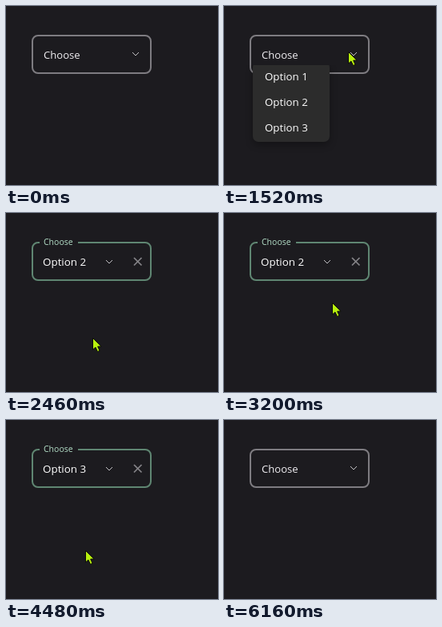
Animation of 265x224 px, one loop 6.9 s. Source, as an HTML page with a canvas:

```html
<!DOCTYPE html>
<html lang="en">
<head>
<meta charset="utf-8">
<title>Dropdown field</title>
<style>
html, body { margin: 0; width: 100%; height: 100%; overflow: hidden; background: #1c1b1f; }
canvas { display: block; }
</style>
</head>
<body>
<canvas id="stage" width="265" height="224"></canvas>
<script>
const ctx = document.getElementById('stage').getContext('2d');
const BG = '#1c1b1f', GREY = '#7e7c81', GREEN = '#5f8672';
const LOOP = 6900, START = 520, LEAD = 12, TICK = 66.8;

const speedUp = f => f * f;
const slowDown = f => 1 - (1 - f) ** 2;
const smooth = f => f * f * (3 - 2 * f);
const clamp = v => Math.max(0, Math.min(1, v));
const mix = (a, b, f) => a + (b - a) * f;
const within = (k, a, b) => k >= a && k < b;

// Stops of the pointer
const edge = [214, 212], arrow = [155, 57], second = [94, 129],
  field = [96, 63], third = [94, 161], cross = [160, 64];

// Pointer moves in ticks; bend is the control point of a curved move
const moves = [
  { start: 0, end: 9, from: [206, 213], to: arrow, ease: slowDown },
  { start: 15, end: 22, from: arrow, to: second, ease: smooth },
  { start: 26, end: 32, from: second, to: edge, ease: speedUp, bend: [111, 186] },
  { start: 37, end: 44, from: edge, to: field, ease: slowDown },
  { start: 47, end: 53, from: field, to: third, ease: smooth },
  { start: 58, end: 69, from: third, to: cross, ease: smooth, bend: [209, 213] },
  { start: 75, end: 83, from: cross, to: [231, 208], ease: speedUp }
];
const presses = [11, 24, 44, 54, 72];

function pointerAt(k) {
  if (!within(k, 0, 33) && !within(k, 37, 84)) return null;
  const { start, end, from, to, ease, bend } = moves.findLast(m => k >= m.start);
  const f = ease(clamp((k - start) / (end - start)));
  return from.map((a, i) => {
    const c = bend ? bend[i] : (a + to[i]) / 2;
    return Math.round(mix(mix(a, c, f), mix(c, to[i], f), f));
  });
}

function text(s, x, y, size, color) {
  ctx.font = '500 ' + size + 'px "Open Sans", "Noto Sans", sans-serif';
  ctx.fillStyle = color;
  ctx.fillText(s, x, y);
}

function line(points, color, width) {
  ctx.beginPath();
  points.forEach(([x, y]) => ctx.lineTo(x, y));
  ctx.strokeStyle = color;
  ctx.lineWidth = width;
  ctx.stroke();
}

function box(x, y, w, h, r) {
  ctx.beginPath();
  ctx.roundRect(x, y, w, h, r);
}

function chevron(x, y) {
  line([[x - 4, y - 2], [x, y + 2], [x + 4, y - 2]], '#c4c3c6', 1);
}

function drawField(value, lift, focused, dimClear) {
  box(33, 37, 148, 47, 7);
  ctx.strokeStyle = focused ? GREEN : GREY;
  ctx.lineWidth = 2;
  ctx.stroke();
  if (lift > 0.5) {
    ctx.fillStyle = BG;
    ctx.fillRect(42, 35, 48, 5);
  }
  text('Choose', 47, mix(66, 40, lift), mix(13.1, 10.5, lift),
    focused ? '#b4dfc8' : '#f0eef2');
  if (value) {
    text(value, 46, 66, 13.4, '#fff');
    chevron(129, 61);
    const color = dimClear ? '#69686b' : '#858488';
    line([[160, 56], [169.5, 65.5]], color, 1.7);
    line([[169.5, 56], [160, 65.5]], color, 1.7);
  } else chevron(162, 60);
}

// age: ticks since the menu began to slide open
function drawMenu(top, width, textX, age, checked, pointer, pressed) {
  const shift = -Math.floor(45 * Math.exp(-1.8 * age));
  ctx.save();
  ctx.beginPath();
  ctx.rect(0, top - 3, 265, 224);
  ctx.clip();
  ctx.translate(0, shift);
  ctx.save();
  ctx.shadowColor = 'rgba(0,0,0,.3)';
  ctx.shadowBlur = 10;
  ctx.shadowOffsetY = 4;
  box(36, top, width, 100, 7);
  ctx.fillStyle = '#2c2c2c';
  ctx.fill();
  ctx.restore();
  for (let i = 0; i < 3; i++) {
    const mid = top + 18 + 32 * i;
    const hover = !shift && Math.abs(pointer[1] - mid) < 15;
    if (hover) {
      box(40, mid - 14, width - 8, 28, 4);
      ctx.fillStyle = '#383838';
      ctx.fill();
    }
    text('Option ' + (i + 1), textX, mid + 5, 13.3, hover && pressed ? '#cfcfcf' : '#fff');
    if (i === checked) line([[53, mid + .5], [57, mid + 4.5], [65, mid - 4]], '#fff', 1.2);
  }
  ctx.restore();
}

function drawPointer([x, y], pressed) {
  ctx.save();
  ctx.translate(x + .5, y + .5);
  ctx.beginPath();
  [[0, 0], [0, 14.5], [3.4, 11.5], [6, 17], [8.6, 15.9], [6.2, 10.6], [10.6, 10.4]]
    .forEach(p => ctx.lineTo(...p));
  ctx.closePath();
  ctx.fillStyle = '#b8f00e';
  ctx.fill();
  ctx.strokeStyle = '#0c0d08';
  ctx.lineWidth = 1;
  ctx.stroke();
  if (pressed) {
    ctx.beginPath();
    ctx.arc(-1, -1, 12, 0, 7);
    ctx.fillStyle = 'rgba(255,255,0,.47)';
    ctx.fill();
  }
  ctx.restore();
}

function draw(t) {
  const k = Math.floor((t - START + LEAD) / TICK);
  const pointer = pointerAt(k);
  const pressed = presses.some(p => within(k, p, p + 2));
  const value = within(k, 26, 56) ? 'Option 2' : within(k, 56, 74) ? 'Option 3' : '';
  const focused = k === 13 || within(k, 26, 46) || within(k, 56, 74);
  const lift = k === 13 ? 1 : clamp(Math.min((k - 25) / 3, (76 - k) / 3));

  ctx.fillStyle = BG;
  ctx.fillRect(0, 0, 265, 224);
  drawField(value, lift, focused, within(k, 68, 74));
  if (within(k, 14, 26)) drawMenu(77, 96, 51, k - 14, -1, pointer, pressed);
  if (within(k, 47, 56)) drawMenu(81, 113, 79, k - 47, 1, pointer, pressed);
  if (pointer) drawPointer(pointer, pressed);
}

const origin = performance.now();
function frame() {
  draw((performance.now() - origin) % LOOP);
  requestAnimationFrame(frame);
}
frame();
</script>
</body>
</html>
```
